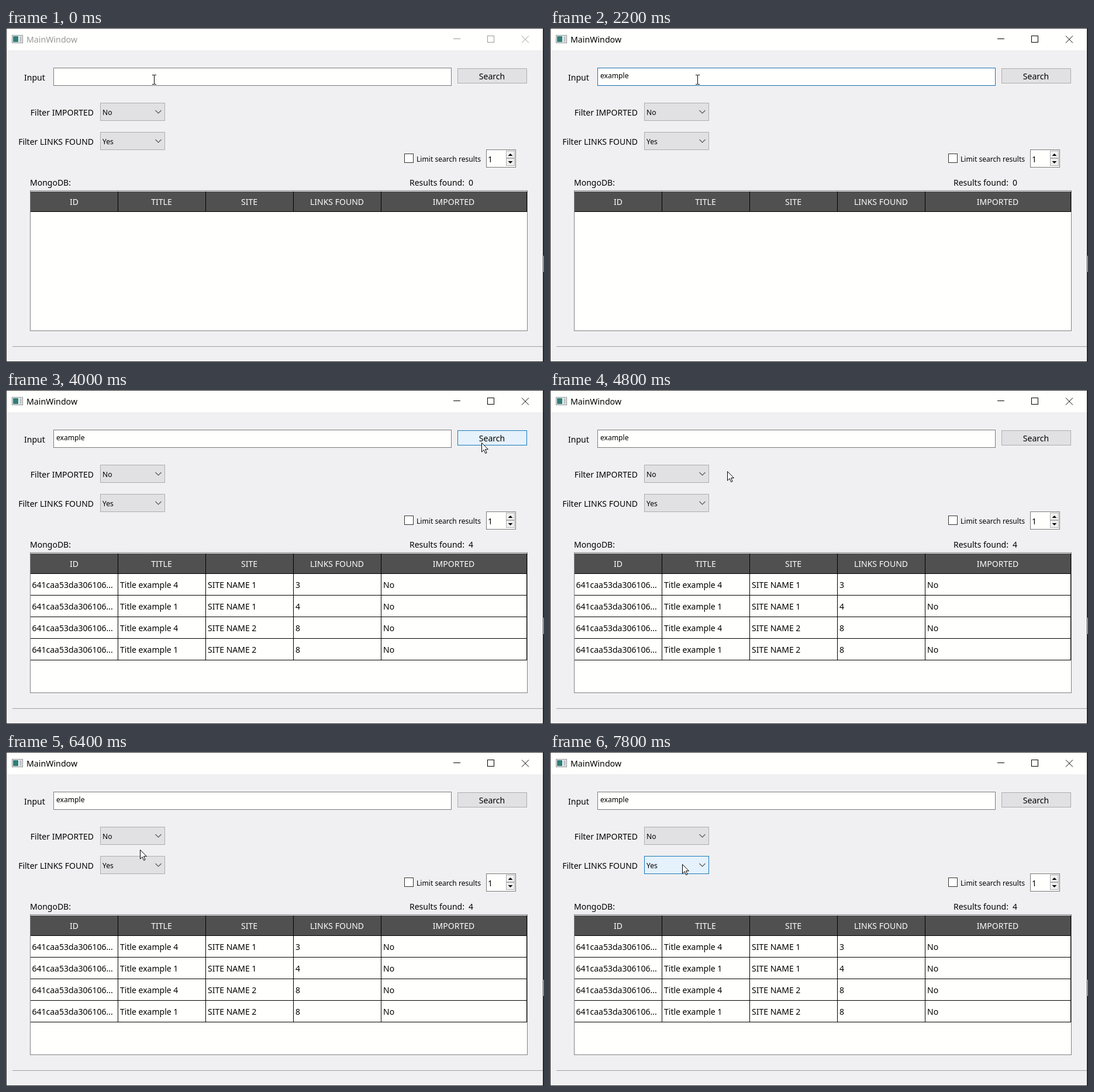
These frames come from a looping animation (920x572 px, 8 s). An HTML page:

```html
<!DOCTYPE html>
<html lang="en">
<head>
<meta charset="utf-8">
<title>MainWindow</title>
<style>
  html, body { margin: 0; width: 100%; height: 100%; overflow: hidden; background: #f0f0f2; }
  svg { display: block; font: 14px "Noto Sans", "Open Sans", sans-serif; }
  rect, .line { shape-rendering: crispEdges; }
  text { white-space: pre; }
  .small { font-size: 12.1px; }
  .mid { text-anchor: middle; }
  .end { text-anchor: end; }
  .field { fill: #fffffe; stroke: #7a7a7a; }
  .field.focus { stroke: #1a6fb0; }
  .ctl { fill: #e1e1e3; stroke: #adadad; }
  .ctl.hover { fill: #e5f1fb; stroke: #1878b8; }
  .ctl.press { fill: #cce4f7; stroke: #005499; }
  .chevron { fill: none; stroke: #555; stroke-width: 1.1; }
  .line { fill: none; stroke: #000; }
  .caption { fill: #000; stroke: #000; }
  .caption text { stroke: none; font-size: 14.2px; }
  .caption path, .caption rect { fill: none; }
  .idle { fill: #999; stroke: #999; }
</style>
</head>
<body>
<svg width="920" height="572" viewBox="0 0 920 572">
  <rect width="920" height="572" fill="#2b2b2d"/>
  <rect x="919" y="390" width="1" height="28" fill="#ddd"/>
  <rect x="1" y="1" width="917" height="570" fill="#f0f0f2"/>
  <rect x="1" y="1" width="917" height="37" fill="#fffffe"/>

  <rect x="10.5" y="12.5" width="18" height="13" fill="#f4f4f4" stroke="#8a8f94"/>
  <rect x="12" y="14" width="9" height="10" fill="#2f7f78"/>
  <rect x="23" y="14" width="4" height="10" fill="#c4cacc"/>
  <g id="caption" class="caption">
    <text x="35" y="25">MainWindow</text>
    <path class="edge" d="M765 18.5h12" shape-rendering="crispEdges"/>
    <rect x="823.5" y="13.5" width="11" height="11"/>
    <path d="M882 13.5l12 12m0-12l-12 12"/>
  </g>

  <text x="31" y="90">Input</text>
  <rect id="input" class="field" x="81.5" y="68.5" width="680" height="30"/>
  <text id="typed" class="small" x="86" y="86"></text>
  <path id="caret" class="line" d="M0 73v16"/>

  <rect id="search" class="ctl" x="772.5" y="69.5" width="118" height="25"/>
  <text class="mid" x="831" y="88">Search</text>

  <text class="end" x="150" y="150">Filter IMPORTED</text>
  <rect id="importedBox" class="ctl" x="161.5" y="128.5" width="110" height="30"/>
  <text id="imported" class="small" x="165" y="149"></text>
  <path class="chevron" d="M255.5 141l5 5 5-5"/>

  <text class="end" x="150" y="200">Filter LINKS FOUND</text>
  <rect id="linksBox" class="ctl" x="161.5" y="178.5" width="110" height="30"/>
  <text id="links" class="small" x="165" y="199"></text>
  <path class="chevron" d="M255.5 191l5 5 5-5"/>

  <rect x="681.5" y="215.5" width="15" height="15" fill="#fffffe" stroke="#333"/>
  <text class="small" x="702" y="229">Limit search results</text>
  <rect class="field" x="821.5" y="208.5" width="50" height="30"/>
  <rect x="855.5" y="210.5" width="14" height="12" fill="#f0f0f0" stroke="#adadad"/>
  <rect x="855.5" y="223.5" width="14" height="12" fill="#f0f0f0" stroke="#adadad"/>
  <path d="M858.5 219l4-4 4 4zM858.5 228l4 4 4-4z"/>
  <text x="824" y="230">1</text>

  <text x="41" y="270">MongoDB:</text>
  <text x="690" y="270">Results found:</text>
  <text id="count" x="791" y="270"></text>
  <rect x="41.5" y="278.5" width="850" height="240" fill="#fffffe" stroke="#828285"/>
  <rect x="42" y="280" width="849" height="35" fill="#505050"/>
  <g id="heads" fill="#fff"></g>
  <g id="rows"></g>
  <path id="grid" class="line"/>
  <path class="line" d="M11 545.5h907" style="stroke:#a0a0a0"/>

  <path id="beam" fill="none" stroke="#000" d="M-3.5-7.5h3l.5.5.5-.5h3M0-7v15M-3.5 8.5h3l.5-.5.5.5h3"/>
  <path id="arrow" fill="#fff" stroke="#000" d="M.5.5v15.6l3.6-3.5 2.6 5.9 2.4-1-2.6-5.8h4.9z"/>
</svg>
<script>
const LOOP = 8000, STEP = 200;
const $ = id => document.getElementById(id);

const cols = [42, 191, 341, 491, 641, 890];
const heads = ['ID', 'TITLE', 'SITE', 'LINKS FOUND', 'IMPORTED'];
// title number, site number, links, imported
const records = [
  [4, 1, 3, 'No'], [1, 1, 4, 'No'], [2, 1, 6, 'Yes'], [3, 1, 0, 'No'],
  [4, 2, 8, 'No'], [1, 2, 8, 'No'], [2, 2, 4, 'Yes'], [3, 2, 0, 'No']
];
// time, x, y of the pointer
const path = [
  [0, 253, 88], [200, 252, 88], [2400, 252, 88], [2600, 300, 86], [3200, 792, 88],
  [3400, 813, 90], [4200, 813, 90], [4400, 710, 104], [4800, 303, 139],
  [5000, 240, 143], [5200, 233, 144], [6200, 233, 144], [6600, 225, 190],
  [6800, 225, 192], [7000, 225, 192], [7200, 226, 192], [LOOP, 226, 192]
];

function pointerAt(t) {
  const i = path.findIndex(p => p[0] > t);
  const [t0, x0, y0] = path[i - 1], [t1, x1, y1] = path[i];
  const k = (t - t0) / (t1 - t0);
  return [Math.round(x0 + (x1 - x0) * k), Math.round(y0 + (y1 - y0) * k)];
}

function inside(id, [x, y]) {
  const b = $(id).getBBox();
  return x >= b.x && x <= b.x + b.width && y >= b.y && y <= b.y + b.height;
}

const show = (id, on) => $(id).setAttribute('visibility', on ? 'visible' : 'hidden');
const place = (id, x, y) => $(id).setAttribute('transform', `translate(${x} ${y})`);

$('heads').innerHTML = heads.map((h, i) =>
  `<text class="mid" x="${(cols[i] + cols[i + 1]) / 2}" y="303">${h}</text>`).join('');

function fillTable(list) {
  $('count').textContent = list.length;
  $('rows').innerHTML = list.map(([title, site, links, done], r) =>
    ['641caa53da306106...', `Title example ${title}`, `SITE NAME ${site}`, links, done]
      .map((s, c) => `<text x="${cols[c] + (c ? 4 : 2.5)}" y="${339 + 37 * r}">${s}</text>`)
      .join('')).join('');
  const bottom = 314 + 37 * list.length;
  let d = '';
  for (let y = 314; y <= bottom; y += 37) d += `M42 ${y + .5}H891`;
  for (const x of cols.slice(1)) d += `M${x + .5} 280V${bottom + 1}`;
  $('grid').setAttribute('d', d);
}

function draw(t) {
  const pos = pointerAt(t);
  const focus = t >= 200 && t < 3400;
  $('caption').setAttribute('class', t < 200 ? 'caption idle' : 'caption');
  $('input').setAttribute('class', focus ? 'field focus' : 'field');

  const letters = t < 800 ? 0 : t < 2200 ? Math.min(6, (t - 600) / STEP) : 7;
  $('typed').textContent = 'example'.slice(0, letters);
  show('caret', focus && t < 2200);
  place('caret', Math.round(86 + (letters ? $('typed').getComputedTextLength() : 0)) + .5, 0);

  for (const id of ['search', 'importedBox', 'linksBox'])
    $(id).setAttribute('class', inside(id, pos) ? 'ctl hover' : 'ctl');
  if (t === 3400) $('search').setAttribute('class', 'ctl press');

  const imported = t >= 5400 && t < 6200 ? 'Yes' : 'No';
  const links = t >= 6800 && t < 7400 ? 'No' : 'Yes';
  $('imported').textContent = imported;
  $('links').textContent = links;
  fillTable(t < 3800 ? [] : records.filter(r =>
    r[3] === imported && (r[2] > 0) === (links === 'Yes')));

  const beam = inside('input', pos);
  show('beam', beam);
  show('arrow', !beam);
  place('beam', pos[0] + .5, pos[1]);
  place('arrow', ...pos);
}

const start = performance.now();
let last = -1;
function tick() {
  const t = Math.floor((performance.now() - start) % LOOP / STEP) * STEP;
  if (t !== last) draw(last = t);
  requestAnimationFrame(tick);
}
tick();
</script>
</body>
</html>
```
